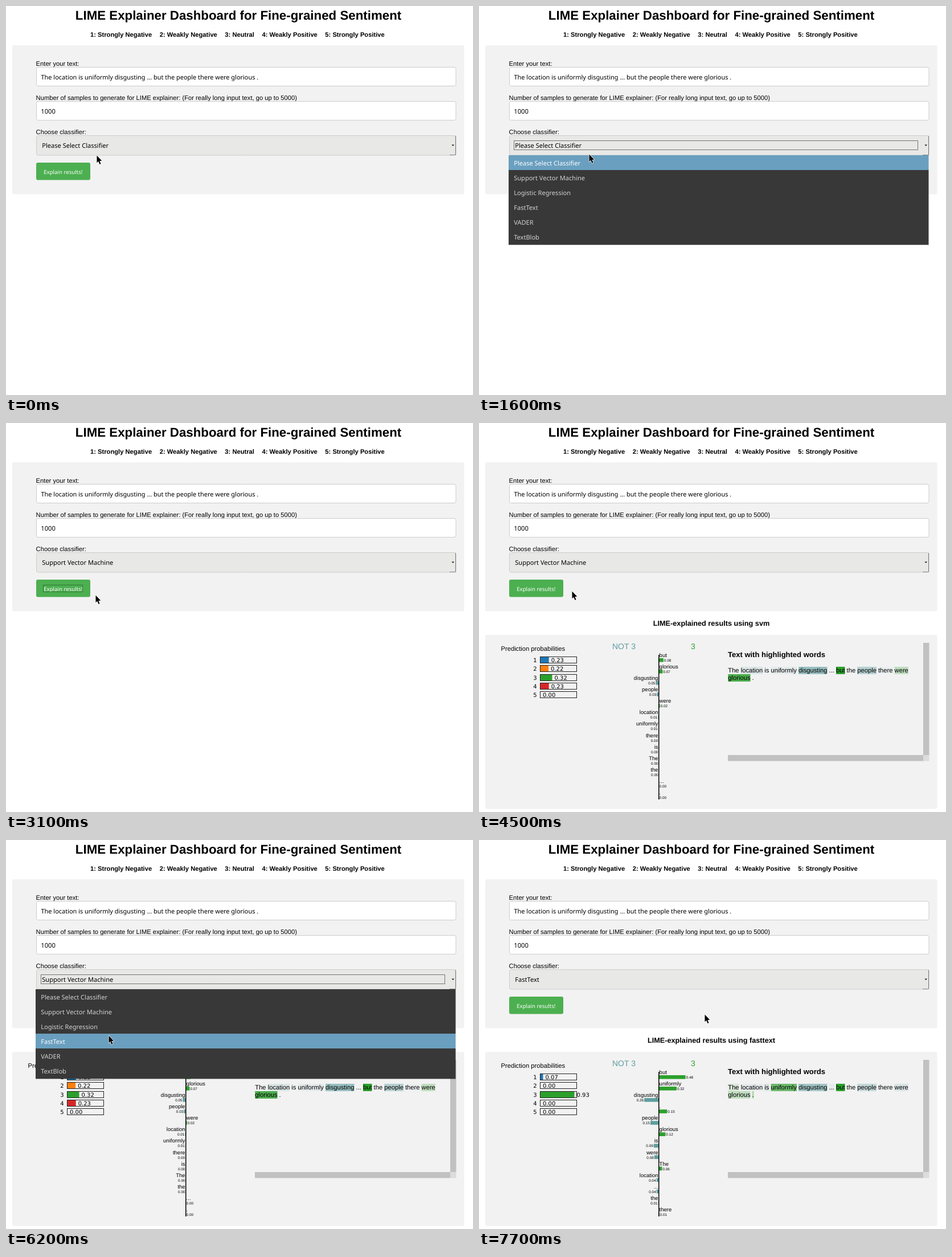
An HTML page with a canvas for the animation above (8 s loop, 820 by 683 pixels).

```html
<!DOCTYPE html>
<html lang="en">
<head>
<meta charset="utf-8">
<title>Sentiment dashboard</title>
<style>
  html, body { margin: 0; width: 100%; height: 100%; overflow: hidden; background: #fff; }
  canvas { display: block; width: 820px; height: 683px; }
</style>
</head>
<body>
<canvas id="stage" width="820" height="683"></canvas>
<script>
const ctx = document.getElementById('stage').getContext('2d');
const LOOP = 8000, STEP = 100;
const SANS = '"Liberation Sans", Arial, sans-serif';
const NOTO = '"Noto Sans", "Open Sans", sans-serif';
const DEJAVU = '"DejaVu Sans", sans-serif';
const GREEN = '44,160,44', TEAL = '95,158,160';
const CLASS_COLORS = ['#1f77b4', '#ff7f0e', '#2ca02c', '#d62728', '#9467bd'];
const RATINGS = ['Strongly Negative', 'Weakly Negative', 'Neutral', 'Weakly Positive', 'Strongly Positive'];
const SENTENCE = 'The location is uniformly disgusting ... but the people there were glorious .';
const OPTIONS = ['Please Select Classifier', 'Support Vector Machine', 'Logistic Regression',
  'FastText', 'VADER', 'TextBlob'];

// Words in order of weight; a leading "-" marks one that speaks against class 3
const SVM = {
  name: 'svm',
  probs: [.23, .22, .32, .23, 0],
  words: 'but glorious -disgusting -people were -location -uniformly -there -is -The -the ... .'
    .split(' ').map((w, i) => weigh(w, .084 * Math.exp(-.182 * i ** 1.45)))
};
const FASTTEXT = {
  name: 'fasttext',
  probs: [.07, 0, .93, 0, 0],
  words: ('but=.48 uniformly=.32 -disgusting=.26 .=.15 -people=.15 glorious=.12 -is=.09 ' +
    '-were=.08 The=.06 -location=.04 -...=.04 -the=.01 there=.01')
    .split(' ').map(entry => weigh(...entry.split('=')))
};

// Pointer moves: start time, end time, x, y
const HOME = [159, 262];
const MOVES = [
  [0, 600, 194, 243],
  [1500, 2200, 190, 306],
  [2800, 3100, 157, 302],
  [4400, 4600, 165, 292],
  [4800, 4900, 184, 256],
  [5000, 5100, 193, 245],
  [5600, 5900, 185, 320],
  [6000, 6200, 180, 343],
  [6400, 6600, 172, 314],
  [6700, 7000, 126, 288],
  [7300, 7400, 396, 306]
];

function weigh(word, value) {
  const against = word[0] === '-';
  return { word: against ? word.slice(1) : word, value: +value, side: against ? -1 : 1 };
}

const clamp = v => Math.min(1, Math.max(0, v));
const within = (t, from, to) => t >= from && t < to;
const sideColor = (side, alpha = 1) => `rgba(${side < 0 ? TEAL : GREEN},${alpha})`;

function pointerAt(t) {
  let [x, y] = HOME;
  for (const [from, to, tx, ty] of MOVES) {
    const p = clamp((t - from) / (to - from)), ease = p * (2 - p);
    x += (tx - x) * ease;
    y += (ty - y) * ease;
  }
  return [Math.round(x), Math.round(y)];
}

function text(str, x, y, font, color = '#000', align = 'left') {
  ctx.font = font;
  ctx.fillStyle = color;
  ctx.textAlign = align;
  ctx.fillText(str, x, y);
  return ctx.measureText(str).width;
}

function rect(x, y, w, h, color) {
  ctx.fillStyle = color;
  ctx.fillRect(x, y, w, h);
}

function frame(x, y, w, h, color) {
  ctx.lineWidth = 1;
  ctx.strokeStyle = color;
  ctx.strokeRect(x, y, w, h);
}

function dotted(x, y, w, h, color) {
  ctx.setLineDash([1, 1]);
  frame(x, y, w, h, color);
  ctx.setLineDash([]);
}

function box(x, y, w, h, fill, stroke) {
  ctx.beginPath();
  ctx.roundRect(x, y, w, h, 3);
  ctx.fillStyle = fill;
  ctx.fill();
  if (!stroke) return;
  ctx.lineWidth = 1;
  ctx.strokeStyle = stroke;
  ctx.stroke();
}

function polygon(points) {
  ctx.beginPath();
  for (const [x, y] of points) ctx.lineTo(x, y);
  ctx.closePath();
}

function drawHeader() {
  text('LIME Explainer Dashboard for Fine-grained Sentiment', 408, 23.5,
    'bold 22.3px ' + SANS, '#000', 'center');
  let x = 148;
  RATINGS.forEach((name, i) => {
    x += text(`${i + 1}: ${name}`, x, 54, 'bold 11.2px ' + SANS) + 13.5;
  });
}

function drawField(label, y, height, fill) {
  text(label, 52.6, y - 2.7, '11.2px ' + SANS);
  box(53.5, y, 736.5, height, fill, '#ccc');
}

function drawForm(choice, selectFocus, buttonFocus) {
  box(11, 69, 793.5, 261.5, '#f2f2f2');

  drawField('Enter your text:', 107.5, 33, '#fff');
  text(SENTENCE, 61.5, 129, '10.95px ' + NOTO);

  drawField('Number of samples to generate for LIME explainer: ' +
    '(For really long input text, go up to 5000)', 167.5, 33, '#fff');
  text('1000', 61.3, 189, '11.2px ' + NOTO);

  drawField('Choose classifier:', 227.5, 34.5, '#e8e8e7');
  rect(789, 228, 1, 34, '#777');
  rect(779, 261, 11, 1, '#888');
  polygon([[782.5, 243.5], [787, 243.5], [784.75, 246]]);
  ctx.fillStyle = '#111';
  ctx.fill();
  text(choice, 63.3, 249, '11.05px ' + NOTO);
  if (selectFocus) dotted(61.5, 236.5, 709, 16, '#000');

  box(53, 275, 95, 30.5, '#4caf50');
  text('Explain results!', 100.3, 294.5, '9.65px ' + NOTO, '#fff', 'center');
  if (buttonFocus) dotted(65.5, 284.5, 69, 12, '#15401a');
}

function drawProbs(probs) {
  text('Prediction probabilities', 38.5, 400, '11.2px ' + SANS);
  const font = '10px ' + DEJAVU;
  probs.forEach((p, i) => {
    const y = Math.round(410 + i * 15.3), base = y + 10;
    text(i + 1, 101.5, base, font, '#000', 'right');
    rect(108, y, 64 * p, 12, CLASS_COLORS[i]);
    frame(107.5, y + .5, 64, 11, '#222');
    text(p.toFixed(2), 112 + 64 * p, base, font);
  });
}

function drawWeights(words) {
  const axis = 315.6;
  text('NOT 3', 234, 396.5, '14px ' + SANS, sideColor(-1));
  text('3', 372, 396.5, '14px ' + SANS, sideColor(1));
  words.forEach(({ word, value, side }, i) => {
    const y = 411 + i * 20.08, len = side * value * 98;
    const align = side < 0 ? 'right' : 'left';
    rect(axis, y + 2, len, 6.6, sideColor(side));
    text(word, axis + side, y, '9.5px ' + SANS, '#000', align);
    text(value.toFixed(2), axis + len + side, y + 8, '6.4px ' + SANS, '#000', align);
  });
  rect(315, 407, 1.5, 254, '#000');
}

function drawHighlights(words) {
  const left = 437.3, font = '11.2px ' + SANS;
  text('Text with highlighted words', 437, 411, 'bold 13px ' + SANS);
  let x = left, y = 438;
  for (const token of SENTENCE.split(' ')) {
    if (token === 'glorious') {
      x = left;
      y += 13;
    }
    const { value, side } = words.find(w => w.word === token);
    ctx.font = font;
    rect(x, y - 10, ctx.measureText(token).width, 13, sideColor(side, value / words[0].value));
    x += text(token, x, y, font) + ctx.measureText(' ').width;
  }
  rect(780, 386, 10.5, 197, '#c1c1c1');
  rect(437, 583, 343, 10.5, '#c1c1c1');
  rect(780, 583, 10.5, 10.5, '#dcdcdc');
}

function drawResults({ name, probs, words }) {
  text('LIME-explained results using ' + name, 408, 355.5, 'bold 12.7px ' + SANS, '#000', 'center');
  box(11, 372, 793.5, 305.5, '#f2f2f2');
  drawProbs(probs);
  drawWeights(words);
  drawHighlights(words);
}

function drawMenu(active, fading) {
  const top = 262, row = fading ? 24.8 : 26;
  const edge = i => Math.round(top + i * row), bottom = edge(OPTIONS.length);
  OPTIONS.forEach((name, i) => {
    const y = edge(i), on = i === active;
    ctx.globalAlpha = fading ? .55 : 1;
    rect(52, y, 737.5, edge(i + 1) - y, on ? '#6a9fbf' : '#383838');
    ctx.globalAlpha = 1;
    const color = fading ? '#e2e2e2' : on ? '#fff' : '#d3d3d3';
    text(name, 61.2, top + (i + .5) * row + 4.5, '11.05px ' + NOTO, color);
  });
  ctx.globalAlpha = fading ? .55 : 1;
  rect(52, bottom, 737.5, 1, '#383838');
  rect(52, bottom + 1, 738, 1, 'rgba(0,0,0,.3)');
  ctx.globalAlpha = 1;
}

function drawPointer(x, y) {
  ctx.save();
  ctx.translate(x + .5, y + .5);
  polygon([[0, 0], [0, 12.8], [2.8, 10.2], [5, 15.4], [7, 14.5], [4.9, 9.5], [8.8, 9.2]]);
  ctx.lineJoin = 'round';
  ctx.lineWidth = 1.4;
  ctx.strokeStyle = '#fff';
  ctx.stroke();
  ctx.fillStyle = '#000';
  ctx.fill();
  ctx.restore();
}

function draw(time) {
  const t = Math.floor(time / STEP) * STEP;
  const [x, y] = pointerAt(t);
  const chosen = t < 2900 ? 0 : t < 6500 ? 1 : 3;
  const menuOpen = within(t, 1200, 2900) || within(t, 5300, 6500);
  const selectFocus = within(t, 1200, 3100) || within(t, 5300, 7000);
  const buttonFocus = within(t, 3100, 4500) || within(t, 7000, 7700);

  ctx.textRendering = 'geometricPrecision';
  rect(0, 0, 820, 683, '#fff');
  drawHeader();
  drawForm(OPTIONS[chosen], selectFocus, buttonFocus);
  if (t >= 4500) drawResults(t < 7700 ? SVM : FASTTEXT);
  if (menuOpen) drawMenu(y > 262 ? Math.floor((y - 262) / 26) : chosen, t < 1300);
  drawPointer(x, y);
}

const start = performance.now();
function tick() {
  draw((performance.now() - start) % LOOP);
  requestAnimationFrame(tick);
}
tick();
</script>
</body>
</html>
```
